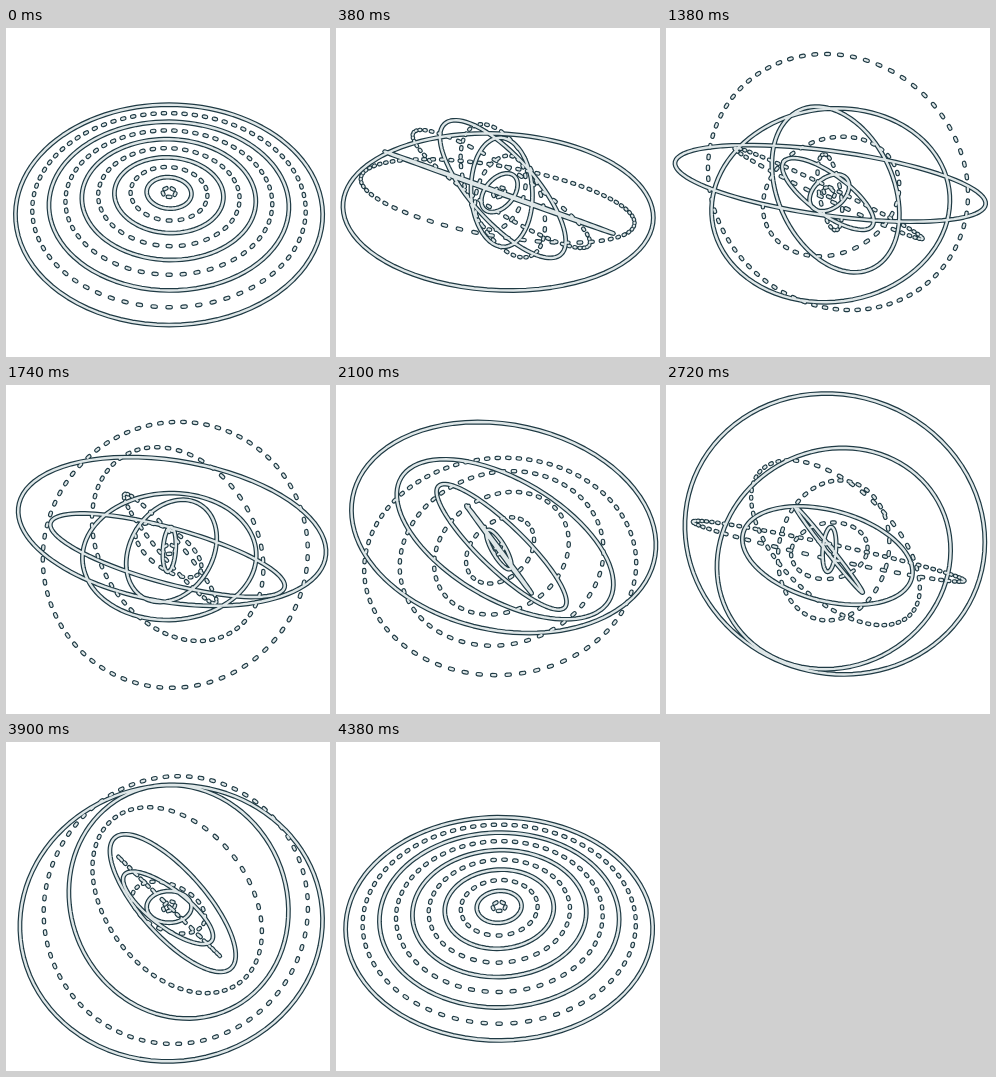
Recreate the animation shown at these times as an HTML page. Size 324 by 329 pixels, loop 4.4 s.

```html
<!DOCTYPE html>
<html lang="en">
<head>
<meta charset="utf-8">
<title>Turning rings</title>
<style>
  html, body { margin: 0; width: 100%; height: 100%; overflow: hidden; background: #fff; }
  svg { display: block; width: 100vw; height: 100vh; }
  path { fill: none; stroke-linecap: round; stroke-linejoin: round; }
  .edge { stroke: #1f3a44; stroke-width: 4.8; }
  .core { stroke: #dfe7e8; stroke-width: 2.4; }
  .dash.edge { stroke-width: 4.5; }
  .dash.core { stroke-width: 2.2; }
</style>
</head>
<body>
<svg viewBox="0 0 324 329">
  <path class="dash edge"/>
  <path class="line edge"/>
  <path class="dash core"/>
  <path class="line core"/>
</svg>
<script>
const LOOP = 4400, STEP = 20;
const RINGS = 10, SIDES = 96, DASH = 2.6;
const CX = 163.1, CY = 164.4, DEPTH = 525;
const TAU = Math.PI * 2, TILT = Math.SQRT1_2;
const lines = document.querySelectorAll('.line');
const dashes = document.querySelectorAll('.dash');

const radius = k => 166.4 - 16 * k;

// Ring k makes k half turns per loop about an axis in its own plane, 9k degrees round.
function projector(k, phase) {
  const r = radius(k);
  const axis = k * Math.PI / 20, turn = k * Math.PI * phase;
  const ca = Math.cos(axis), sa = Math.sin(axis);
  const ct = Math.cos(turn), st = Math.sin(turn);
  return angle => {
    const u = r * Math.cos(angle - axis), v = r * Math.sin(angle - axis);
    const x = u * ca - v * ct * sa;
    const y = u * sa + v * ct * ca;
    const z = v * st;
    const scale = DEPTH / (DEPTH - TILT * (y + z));
    return (CX + x * scale).toFixed(2) + ' ' + (CY + TILT * (y - z) * scale).toFixed(2);
  };
}

function solid(at) {
  const pts = [];
  for (let i = 0; i < SIDES; i++) pts.push(at(i * TAU / SIDES));
  return 'M' + pts.join('L') + 'Z';
}

function dashed(at, k) {
  const count = 85 - 8 * k, half = DASH / radius(k) / 2;
  let d = '';
  for (let i = 0; i < count; i++) {
    const a = TAU / 4 + i * TAU / count;
    d += 'M' + at(a - half) + 'L' + at(a + half);
  }
  return d;
}

function draw(ms) {
  // Each step shows the pose at its middle.
  const phase = (Math.floor((ms % LOOP) / STEP) + 0.5) * STEP / LOOP;
  let line = '', dash = '';
  for (let k = 1; k <= RINGS; k++) {
    const at = projector(k, phase);
    if (k % 2) line += solid(at);
    else dash += dashed(at, k);
  }
  lines.forEach(p => p.setAttribute('d', line));
  dashes.forEach(p => p.setAttribute('d', dash));
}

const start = performance.now();
function tick() {
  draw(performance.now() - start);
  requestAnimationFrame(tick);
}
tick();
</script>
</body>
</html>
```
